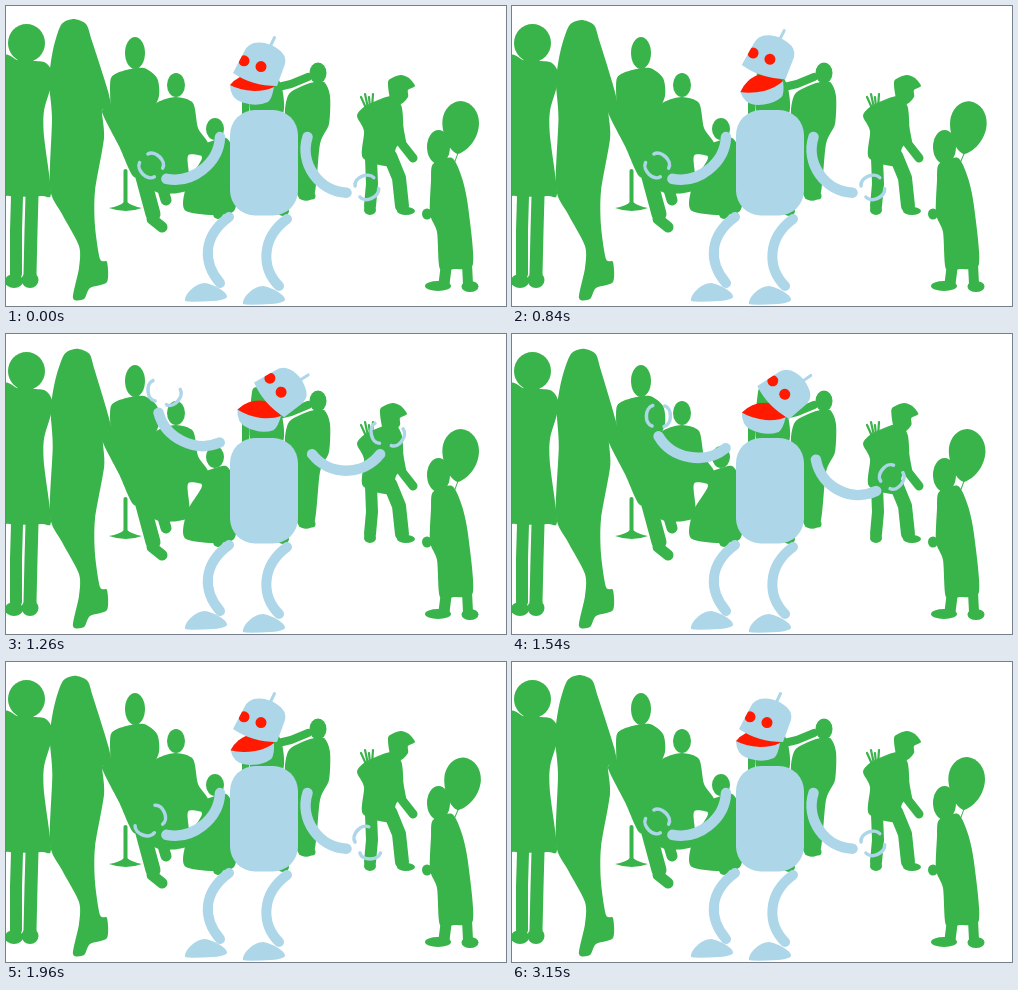
Recreate the animation shown at these times as an HTML page with a canvas. Size 500 px wide and 300 px high, loop 3.22 s.

```html
<!DOCTYPE html>
<html lang="en">
<head>
<meta charset="utf-8">
<title>Robot in the crowd</title>
<style>
html, body { margin: 0; width: 100%; height: 100%; overflow: hidden; background: #fff; }
canvas { display: block; width: 500px; height: 300px; }
</style>
</head>
<body>
<canvas id="stage" width="500" height="300"></canvas>
<script>
const ctx = document.getElementById('stage').getContext('2d');
const GREEN = '#39b44a', BLUE = '#add6e8', RED = '#ff1a00';
const LOOP = 3220, STEP = 70, RAD = Math.PI / 180;

const points = s => s.split(' ').map(p => p.split(',').map(Number));
const clamp = u => Math.min(1, Math.max(0, u));
const smooth = u => u * u * (3 - 2 * u);

// 0 to 1 between a and b, held until c, back to 0 at d; bend > 1 leaves slowly
function pulse(t, a, b, c, d, bend = 1) {
  if (t < b) return smooth(clamp((t - a) / (b - a)));
  return 1 - clamp((t - c) / (d - c)) ** bend;
}

function fill(d, color) {
  ctx.fillStyle = color;
  ctx.fill(new Path2D(d));
}

function line(d, color, width) {
  ctx.strokeStyle = color;
  ctx.lineWidth = width;
  ctx.stroke(new Path2D(d));
}

function oval(x, y, rx, ry = rx) {
  ctx.beginPath();
  ctx.ellipse(x, y, rx, ry, 0, 0, 7);
  ctx.fill();
}

const limb = (width, joints) => line('M' + joints, GREEN, width);

// Closed soft curve through a few points
function blob(pts) {
  const n = pts.length, k = 0.13;
  ctx.beginPath();
  ctx.moveTo(...pts[0]);
  pts.forEach((a, i) => {
    const o = pts[(i + n - 1) % n], b = pts[(i + 1) % n], c = pts[(i + 2) % n];
    ctx.bezierCurveTo(a[0] + (b[0] - o[0]) * k, a[1] + (b[1] - o[1]) * k,
      b[0] - (c[0] - a[0]) * k, b[1] - (c[1] - a[1]) * k, b[0], b[1]);
  });
  ctx.fill();
}

const shape = s => blob(points(s));

// Draw with a shift and a turn about a pivot
function posed(px, py, dx, dy, deg, draw) {
  ctx.save();
  ctx.translate(px + dx, py + dy);
  ctx.rotate(deg * RAD);
  ctx.translate(-px, -py);
  draw();
  ctx.restore();
}

function womanInDress() {
  oval(20.5, 37, 18.5, 19);
  limb(16, '19,50 20,62');
  shape('-5,56 14,55 38,56 46,66 45,80 38,105 38,130 45,187 36,190 3,190 -5,180');
  limb(12, '11,190 10,225 10,268');
  limb(13, '26,190 25,225 24,268');
  oval(8, 275, 9, 7);
  oval(24, 274, 8.5, 8);
}

function longHairedWoman(t) {
  const sway = 3.6 * pulse(t, 0, 1540, 1540, 2240);
  const outline = points('67,13 80,18 86,35 102,85 105,106 96,104 98,132 89,185 89,220 94,253 101,256 '
    + '101,276 84,282 78,293 67,292 73,262 73,240 56,208 44,182 46,112 43,75 47,44 55,19');
  blob(outline.map(([x, y]) => {
    const s = sway * Math.max(0, (140 - y) / 127);
    return [x + s, y + s / 2];
  }));
}

function manOnStool() {
  oval(129, 47, 10, 16);
  shape('120,64 138,62 151,72 153,90 144,115 143,160 128,171 113,140 96,106 104,100 105,72');
  limb(15, '134,160 147,208');
  limb(11, '146,213 156,221');
  limb(4, '119.5,165 119.5,200');
  fill('M103 202Q114 200 118 196H121Q126 200 136 202Q120 208 103 202Z', GREEN);
}

function seatedPair() {
  oval(170, 79, 9, 12);
  shape('152,96 170,91 187,97 192,122 202,137 200,150 182,150 182,184 144,182 140,120 144,106');
  limb(11, '157,184 160,194');
  oval(209, 123, 9, 11);
  shape('200,137 220,132 228,150 228,205 180,205 181,178 196,152 186,142');
  limb(10, '212,203 212,208');
}

function pairBehindRobot() {
  shape('246,58 254,54 264,58 276,82 276,109 245,109');
  ctx.fillRect(236, 82, 7, 28);
  limb(8, '268,82 285,78 302,71');
  oval(312, 67, 8.5, 10.5);
  shape('304,77 318,76 324,90 323,118 314,138 308,190 292,190 288,145 279,112 283,88');
  limb(7, '296,190 306,190');
  oval(277, 205, 6, 5);
}

function manInHat(t) {
  posed(0, 0, -8 * pulse(t, 840, 1260, 1260, 1680), 0, 0, () =>
    shape('382,76 388,71 395,69 403,72 409,80 402,84 402,91 395,98 385,95'));
  shape('372,94 388,90 396,102 397,132 390,142 384,160 357,152 358,125 351,110 358,101');
  for (let i = 0; i < 4; i++) limb(2.2, `${360 + i * 2},102 ${355 + i * 4},${91 - 3 * (i % 2)}`);
  limb(9, '391,112 396,138 407,152');
  limb(12, '365,152 366,178 364,200');
  limb(14, '384,150 393,172 396,200');
  oval(364, 204, 6, 5);
  oval(400, 205, 9, 4);
}

function childWithBalloon(t) {
  oval(432.5, 141, 11.5, 17);
  shape('427,158 446,152 456,172 462,200 467,258 448,263 434,263 431,226 424,208 425,175');
  oval(421, 208, 5, 5.5);
  limb(11, '440,262 438,278');
  limb(10, '461,258 462,278');
  oval(432, 280, 13, 5);
  oval(464, 280.5, 8.5, 5.5);

  const u = t < 1260 ? t / 1260 : (t - 1260) / 1890;
  posed(449, 153, 0, 0, 3.6 * Math.sin(Math.PI * clamp(u)) ** 2, () => {
    fill('M452 148C442 146 434 123 437 111C440 99 449 95 455 95C466 96 473 106 473 117C473 130 464 144 452 148Z', GREEN);
    line('M452 147L448 158', GREEN, 1);
  });
}

function drawHead(t) {
  const lift = pulse(t, 420, 840, 1260, 1890, 1.4);
  const tilt = pulse(t, 840, 1260, 1260, 1890, 3);
  const chatter = 17 * pulse(t, 420, 840, 840, 1260) + 12 * pulse(t, 1400, 1960, 1960, 2800);

  posed(0, 0, 268 + 3 * lift + 4 * tilt, 81 - 6 * lift + 7 * tilt, 6 * tilt - chatter, () => {
    fill('M0 0Q-2 12 -6 15Q-15 19 -25 17Q-37 15 -41 9Q-44 4 -44 -2Z', BLUE);
    fill('M0 0Q-8 4 -20 4Q-35 3 -44 -2Q-40 -7 -34 -10Q-26 -14 -16 -13Q-6 -9 0 0Z', RED);
  });

  posed(246.5, 57.7, 3 * lift + 20 * tilt, -7.5 * lift + tilt, 1.5 * lift + 31 * tilt, () => {
    line('M264.5 40L268.5 31.5', BLUE, 3);
    const skull = 'M227 67L238 46Q242 36 254 36.5Q264 37 272 43Q281 49 279 58L271 80Q246 80 227 67Z';
    fill(skull, BLUE);
    ctx.clip(new Path2D(skull));
    ctx.fillStyle = RED;
    oval(238, 54.8, 5.5);
    oval(255, 60.6, 5.5);
  });
}

// Arm sagging sideways from shoulder to wrist, drawn along its own axis
function arm(x, y, angle, sag) {
  posed(0, 0, x, y, angle, () => line(`M0 0C17 ${sag} 51 ${sag} 68 0`, BLUE, 10.5));
}

function hand(x, y, axis, open) {
  for (const s of [-1, 1]) {
    posed(0, 0, x, y, axis, () => {
      ctx.translate(0, 6 * s);
      ctx.rotate(s * open * RAD);
      line(`M0 0C2 ${8 * s} 18 ${8 * s} 20.5 0`, BLUE, 3.5);
    });
  }
}

function drawArms(t) {
  const left = pulse(t, 840, 1260, 1260, 1820, 2);
  const right = pulse(t, 840, 1260, 1260, 1820);
  const open = 24 * (pulse(t, 840, 1260, 1260, 1540) + pulse(t, 1680, 1960, 1960, 2240));
  posed(215, 130, 0, -21 * left, 64 * left, () => {
    arm(214, 131, 142, -20);
    hand(152.5, 166.5, 224, open);
  });
  posed(301, 130, 4 * right, -10 * right, -55 * right, () => {
    arm(301.5, 131, 55, 22);
    hand(351.5, 185.5, -24, open);
  });
}

function drawRobot(t) {
  line('M223 211C197 230 196 256 214 277', BLUE, 10);
  line('M281 213C255 232 255 262 273 280', BLUE, 10);
  const foot = 'M0 18C-1 11 11 0 20 0C28 1 43 9 42 14Q40 18 18 18.5Q2 19 0 18Z';
  posed(0, 0, 179, 277, 0, () => fill(foot, BLUE));
  posed(0, 0, 237, 280, 0, () => fill(foot, BLUE));
  drawHead(t);
  ctx.fillStyle = BLUE;
  ctx.beginPath();
  ctx.roundRect(224, 104, 68, 105.5, 25);
  ctx.fill();
  drawArms(t);
}

function render(now) {
  const t = Math.floor((now % LOOP) / STEP) * STEP;
  ctx.fillStyle = '#fff';
  ctx.fillRect(0, 0, 500, 300);
  ctx.lineCap = ctx.lineJoin = 'round';
  const crowd = [womanInDress, longHairedWoman, manOnStool, seatedPair,
    pairBehindRobot, manInHat, childWithBalloon];
  for (const draw of crowd) {
    ctx.fillStyle = GREEN;
    draw(t);
  }
  drawRobot(t);
}

let start;
function frame(now) {
  start ??= now;
  render(now - start);
  requestAnimationFrame(frame);
}
render(0);
requestAnimationFrame(frame);
</script>
</body>
</html>
```
